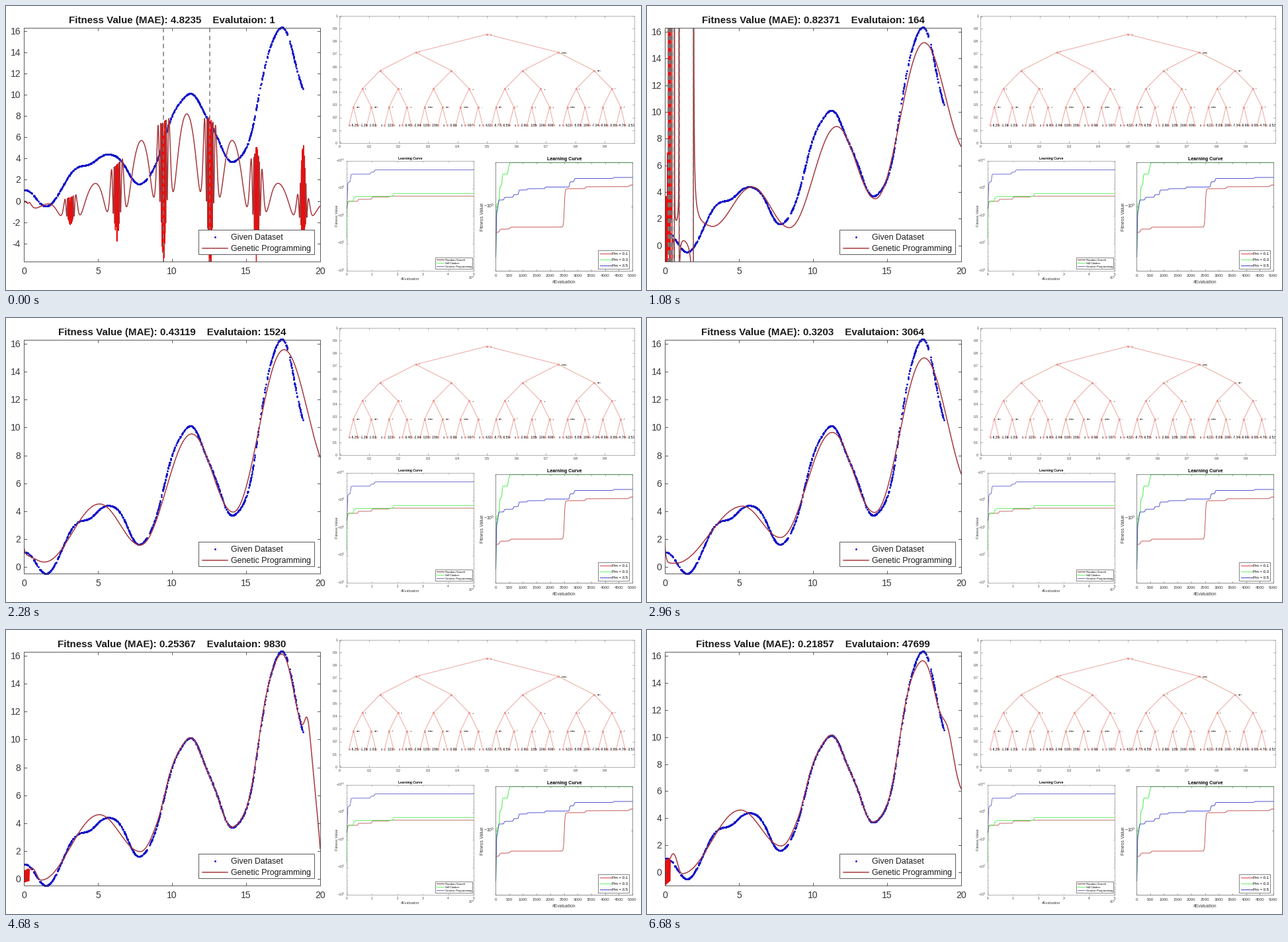
Write a matplotlib script that moves like this. It is 960x429 px and loops after 6.76 s.

```python
import numpy as np
import matplotlib.pyplot as plt
from matplotlib.animation import FuncAnimation
from matplotlib.patches import Rectangle

W, H, DPI = 960, 429, 100
FRAMES, STEP_MS = 169, 40
PX = 72 / DPI
RED, BLUE, GREEN, DENSE = "#a6363a", "#1212c8", "#55f055", "#e61010"
INK, FAINT, GREY = "#383838", "#858585", "#777777"

plt.rcParams["font.family"] = "Liberation Sans"
plt.rcParams["mathtext.default"] = "regular"

fig = plt.figure(figsize=(W / DPI, H / DPI), dpi=DPI, facecolor="white")
ax = fig.add_axes([0, 0, 1, 1])
ax.set_xlim(0, W)
ax.set_ylim(H, 0)
ax.axis("off")


# ---------- drawing helpers, all in pixels ----------
def line(xs, ys, color=INK, lw=0.8, **kw):
    return ax.plot(xs, ys, color=color, lw=lw * PX, **kw)[0]


def label(x, y, s, size, ha="center", color=INK, **kw):
    return ax.text(x, y + 0.36 * size, s, fontsize=size * PX, ha=ha,
                   va="baseline", color=color, **kw)


def side_label(x, y, s, size):
    ax.text(x, y, s, fontsize=size * PX, ha="center", va="center",
            rotation=90, color=INK)


def segments(parts):
    """Join short segments into one nan-separated path."""
    xs, ys = [], []
    for x0, y0, x1, y1 in parts:
        xs += [x0, x1, np.nan]
        ys += [y0, y1, np.nan]
    return xs, ys


def y_ticks(l, r, ys, n):
    return [(l, y, l + n, y) for y in ys] + [(r - n, y, r, y) for y in ys]


def x_ticks(t, b, xs, n):
    return [(x, b, x, b - n) for x in xs] + [(x, t, x, t + n) for x in xs]


def frame_box(l, t, r, b, lw=0.8, color=FAINT, fill="none", z=4):
    ax.add_patch(Rectangle((l, t), r - l, b - t, fc=fill, ec=color,
                           lw=lw * PX, zorder=z))


def legend(l, t, r, b, rows, x0, x1, size):
    frame_box(l, t, r, b, 0.7, "#555555", "white", 6)
    gap = (b - t - 2) / len(rows)
    for k, (name, color) in enumerate(rows):
        y = t + 1 + gap * (k + 0.5)
        line([x0, x1], [y, y], color, 0.9, zorder=7)
        label(x1 + 2, y, name, size, "left", "black", zorder=7)


# ---------- curves of the main plot ----------
X = np.linspace(0.001, 20, 4001)
L, T, R, B = 27, 33, 475, 386
TOP = 16.3


def dataset(x):
    s, c = np.sin(x), np.cos(x)
    return (x / 2 - x / 3 * s + x / 6 * s ** 2 + np.cos(2 * x)
            + 0.05 * x * np.sin(2 * x) * c ** 2)


def bump(center, width):
    return np.exp(-((X - center) / width) ** 2)


def waves(*extremes):
    """Cosine half-waves from one extreme to the next."""
    x, y = np.array(extremes, float).T
    i = np.clip(np.searchsorted(x, X) - 1, 0, len(x) - 2)
    u = (X - x[i]) / (x[i + 1] - x[i])
    return y[i] + (y[i + 1] - y[i]) * (0.5 - 0.5 * np.cos(np.pi * u))


def first_guess():
    spike = np.exp(-(np.sin(X) / 0.16) ** 2)
    high = 8.9 * bump(11, 5.4) - 0.7 + 5 * spike * (X / 18.85) ** 6
    low = 2.4 * bump(11, 4) - 1.4 - 8 * spike * bump(12, 6)
    swing = np.cos(2.4 / np.tan(X))
    return ((high + low) / 2 + swing * (high - low) / 2) * np.clip(X / 1.5, 0, 1)


def late(start, peak):
    hump = waves((0, start), (.57, peak), (1.15, -.1), (5.1, 4.6),
                 (7.85, 1.95), (11.1, 10.1), (20, 10))
    follow = 1 / (1 + np.exp((9 - X) / 0.15))
    return hump + follow * (dataset(X) - hump)


final = late(.1, 1.37) - 0.7 * bump(17.4, 0.8) + 1.2 * bump(19.1, 0.45)
SHAPES = [
    first_guess(),
    waves((0, 1.3), (3.1, 1.05), (5.9, 4.25), (8.4, 1.25), (11.6, 8.85),
          (14.2, 3.45), (17.5, 15.15), (20.4, 7)),
    waves((0, 1.3), (1.65, .15), (5.05, 4.65), (7.9, 1.1), (11.35, 9.45),
          (14.1, 3.95), (17.6, 16.1), (20.8, 7.6)),
    waves((0, .24), (.7, .25), (5.25, 4.35), (7.8, 2.1), (11.3, 9.65),
          (14.15, 3.9), (17.5, 15), (20.7, 5.6)) + 1.4 * np.exp(-X / 0.08),
    late(.4, .75) - 0.2 * bump(17.4, 0.8) + 2.2 * bump(19.15, 0.28)
    - 4 * np.clip((X - 19.3) / 0.7, 0, 1) ** 2,
    final - 0.22 * bump(0.57, 0.2),
    final,
]
KEYS = [0, 27, 43, 74, 117, 141, 167]
FLOOR = [-5.7, -1.2, -.49, -.49, -.49, -.67, -.98]
FITNESS = [4.8235, .82371, .5508, .3203, .25367, .22217, .21857]
COUNT = [1, 164, 857, 3064, 9830, 13033, 47699]
STAGE = np.arange(len(KEYS))

v = 6.06 / X
POLES = 0.7 * (1 / np.sin(v) - 1 / v)
NEAR_PI = (np.abs((X + 1) % np.pi - 1) < 0.12) & (X > 1)
DASHES = [[3 * np.pi, 4 * np.pi], [1.93 / n for n in range(1, 9)]]


def pose(n):
    """Curve, dense mask, dashed lines and stage for one frame."""
    u = np.interp(n, KEYS, STAGE)
    if u < 1:
        u = np.sqrt(u)
    i = min(int(u), len(KEYS) - 2)
    y = SHAPES[i] + (u - i) * (SHAPES[i + 1] - SHAPES[i])
    near = int(u + 0.5)
    dense = np.zeros(X.shape, bool)
    if near == 0:
        dense = NEAR_PI
    elif near == 1:
        y = y + POLES
        dense = X < 0.48
    elif near >= 4:
        dense = X < 0.38
        lo = np.interp(u, [4, 5, 6], [-.25, -.66, -.98]) * (1 - X)
        hi = np.interp(u, [4, 5, 6], [.75, 1, 1.1]) * (0.75 + 0.7 * X)
        y = np.where(dense, (lo + hi) / 2 + (hi - lo) / 2 * np.sin(8 / X), y)
    return y, dense, DASHES[near] if near < 2 else [], u


def to_x(x):
    return L + np.asarray(x) * (R - L) / 20


# ---------- main plot ----------
clip = Rectangle((L, T), R - L, B - T, transform=ax.transData)
rng = np.random.default_rng(4)
sample = np.sort(rng.uniform(0, 6 * np.pi, 900))
dots = line([], [], BLUE, 0, marker="o", ms=2.9 * PX, mew=0, zorder=2)
fit = line([], [], RED, 1.5, zorder=3)
burst = line([], [], DENSE, 1.3, zorder=3)
poles = line([], [], GREY, 1.5, dashes=(4.5, 3.5), zorder=3.5,
             dash_capstyle="butt")
for art in (fit, burst, poles):
    art.set_clip_path(clip)
ticks = line([], [], "#4a4a4a", 0.9, zorder=4)
tick_text = {k: label(22, 0, str(k), 14, "right") for k in range(-4, 17, 2)}
title = label(251, 21, "", 15.1, color="#1a1a1a", weight="bold")

frame_box(L, T, R, B, 0.9, "#4a4a4a")
line(*segments(x_ticks(T, B, to_x([5, 10, 15]), 4)), "#4a4a4a", 0.9)
for k in range(0, 21, 5):
    label(to_x(k), 400, str(k), 14)

frame_box(291, 338, 466, 375, 0.9, "#4a4a4a", "white", 6)
line([315.5], [349], BLUE, 0, marker="o", ms=2.9 * PX, mew=0, zorder=7)
line([297, 335], [366, 366], RED, 1.5, zorder=7)
label(340, 349, "Given Dataset", 12.4, "left", "#1a1a1a", zorder=7)
label(340, 366, "Genetic Programming", 12.4, "left", "#1a1a1a", zorder=7)


# ---------- expression tree ----------
def node(level, k):
    n = 2 ** level
    return 727.3 + (k - (n - 1) / 2) * 431 / n, 42.7 + 27.45 * level


frame_box(504, 15, 950, 207, 0.6)
tx = [504.5 + 44.55 * k for k in range(10)]
ty = [207 - 19.2 * k for k in range(11)]
line(*segments(x_ticks(15, 207, tx, 3) + y_ticks(504, 950, ty, 3)), FAINT, 0.6)
for k in range(11):
    if k < 10:
        label(tx[k], 212.5, f"{k / 10:g}", 5)
    label(501, ty[k], f"{k / 10:g}", 5, "right")

links, nodes = [], []
for lev in range(6):
    for k in range(2 ** lev):
        x, y = node(lev, k)
        nodes.append((x, y))
        if lev:
            links.append((*node(lev - 1, k // 2), x, y))
        if lev == 5:
            name = "x" if rng.random() < 0.2 else f"{rng.uniform(-9, 5):.2f}"
            label(x + 9, y, name, 4.8, color="black")
        else:
            name = "+" if lev == 0 else rng.choice(["+", "-", "*", "/", "sin", "max"])
            label(x + 4.5, y, name, 4.4, "left", "black")
line(*segments(links), "#e58d84", 0.75)
line(*zip(*nodes), "#e06a60", 0, marker="o", ms=2.4 * PX, mfc="#f6c4be",
     mew=0.6 * PX)


# ---------- learning curves ----------
def climb(left, right, start, color, lw, *jumps, width=0.7):
    """A line that rises by a height at each (place, height) jump."""
    x = np.linspace(left, right, 1200)
    y = start - sum(h * (0.5 + 0.5 * np.tanh((x - c) / width)) for c, h in jumps)
    line(x, y, color, lw, zorder=3)


frame_box(515, 234, 707, 400, 0.6)
label(611, 230, "Learning Curve", 4.9, color="black", weight="bold")
label(611, 412, "#Evaluation", 5.4)
side_label(500, 317, "Fitness Value", 5.4)
minor = [234 + 41.5 * (d + np.log10(m)) for d in range(4) for m in range(2, 10)]
major = [234 + 41.5 * k for k in range(5)]
gx = [515 + 38.4 * k for k in range(6)]
line(*segments(y_ticks(515, 707, minor, 1.2) + y_ticks(515, 707, major, 2.2)
               + x_ticks(234, 400, gx, 2)), FAINT, 0.5)
for k in range(6):
    label(gx[k], 405, str(k), 4.6)
for k, y in enumerate(major):
    label(513, y, f"$-10^{{{k - 1}}}$", 4.6, "right")
label(703, 411, r"$\cdot 10^{4}$", 4.6)
climb(515, 707, 312, "#b5665e", 0.9, (516, 17), (532, 3), (553, 3.5), (580, 1.3))
climb(515, 707, 400, GREEN, 0.9, (515, 100), (517, 5), (525, 5), (528, 2.3),
      (585, 4.5), width=0.4)
climb(515, 707, 308, "#6464d0", 0.9, (516, 42), (521, 12), (551, 3), (557, 3.4))
legend(649, 380, 705, 396.5, [("Random Search", "#5a3030"),
                              ("Hill Climber", GREEN),
                              ("Genetic Programming", "#6464d0")],
       651, 662, 4.3)

frame_box(740, 236, 947, 400, 0.7, "#606060")
label(844, 230.5, "Learning Curve", 7.1, color="black", weight="bold")
label(844, 416.5, "#Evaluation", 6.8)
side_label(720, 318, "Fitness Value", 7.2)
label(739, 303, "$-10^{0}$", 7, "right")
px = [740 + 20.7 * k for k in range(11)]
line(*segments(x_ticks(236, 400, px, 2) + y_ticks(740, 947, [303], 2.5)),
     "#606060", 0.6)
for k, x in enumerate(px):
    label(x, 406.5, str(500 * k), 6.2)
climb(740.5, 947, 342, "#c24848", 0.9, (746, 5), (762, 3), (844, 58),
      (876, 3), (942, 2.5), width=1.2)
climb(740.5, 947, 398, GREEN, 1.1, (741, 100), (746, 26), (750, 18),
      (759, 11), (761, 6.4))
climb(740.5, 947, 396, "#4444cc", 0.9, (741, 88), (744, 15), (753, 4),
      (767, 4), (775, 7), (788, 2), (815, 2.5), (852, 8), (859, 5), (918, 1.5))
legend(895, 369, 942, 397, [("Pm = 0.1", "#d03030"), ("Pm = 0.3", GREEN),
                            ("Pm = 0.5", "#3030c8")], 898, 914.5, 6)


def update(n):
    n = 162 if 162 <= n < 166 else min(n, KEYS[-1])  # pause before the last gains
    y, dense, dash, u = pose(n)
    low = np.interp(u, STAGE, FLOOR)
    scale = (B - T) / (TOP - low)

    def to_y(val):
        return T + (TOP - val) * scale

    py = to_y(np.clip(y, -40, 60))
    dots.set_data(to_x(sample), to_y(dataset(sample)))
    fit.set_data(to_x(X), np.where(dense, np.nan, py))
    burst.set_data(to_x(X), np.where(dense, py, np.nan))
    poles.set_data(*segments([(to_x(x), T, to_x(x), B) for x in dash]))
    shown = [k for k in tick_text if k >= low]
    ticks.set_data(*segments(y_ticks(L, R, [to_y(k) for k in shown], 4)))
    for k, t in tick_text.items():
        t.set_visible(k in shown)
        t.set_y(to_y(k) + 5)
    mae = np.exp(np.interp(u, STAGE, np.log(FITNESS)))
    count = round(np.exp(np.interp(u, STAGE, np.log(COUNT))))
    title.set_text(f"Fitness Value (MAE): {mae:.5g}    Evalutaion: {count}")
    return dots, fit, burst, poles, ticks, title


anim = FuncAnimation(fig, update, frames=FRAMES, interval=STEP_MS,
                     repeat=True, repeat_delay=0, blit=False)
plt.show()
```
